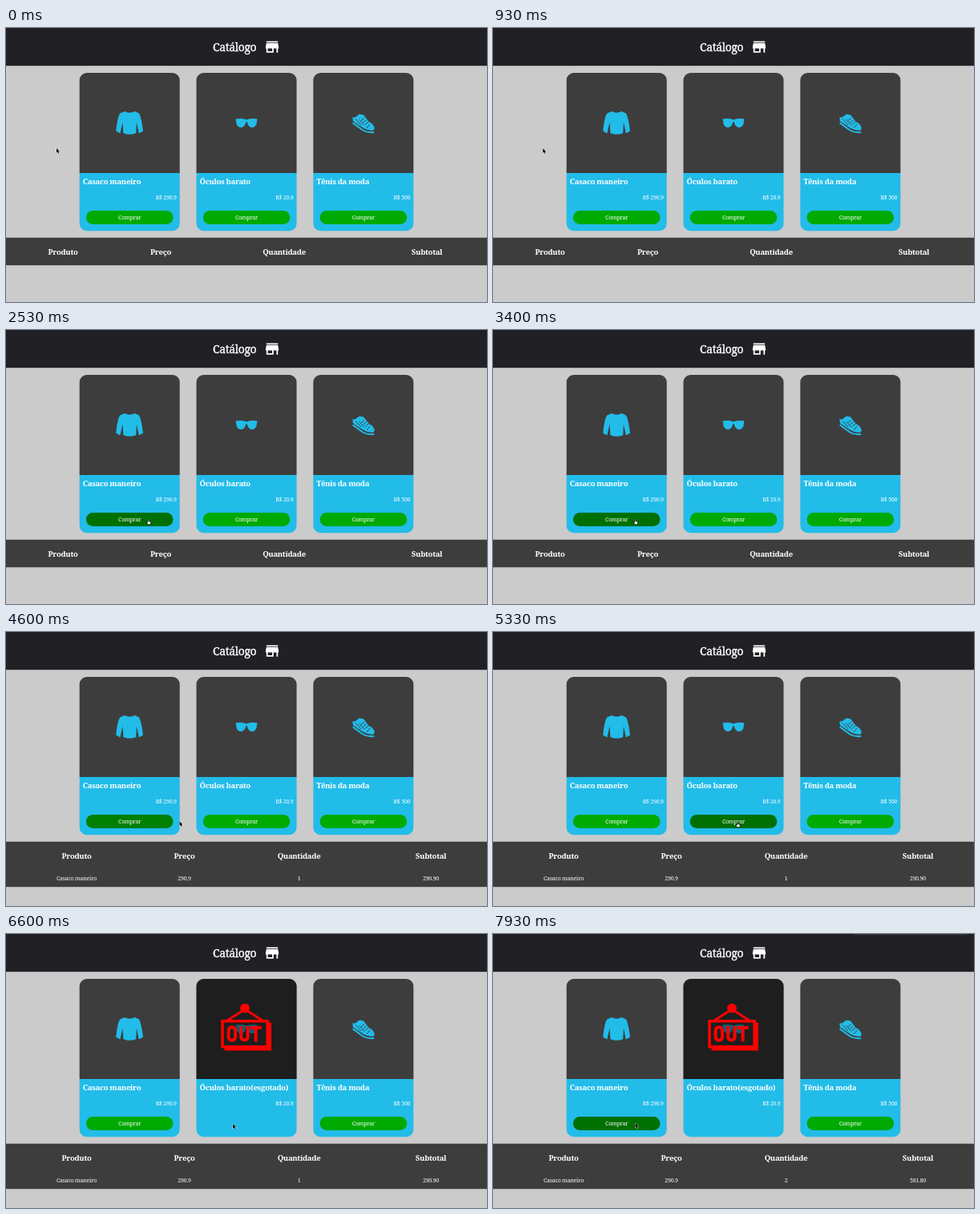
These frames come from a looping animation (600 px wide and 342 px high, 8 s). An HTML page:

```html
<!DOCTYPE html>
<html lang="pt-BR">
<head>
<meta charset="utf-8">
<title>Catálogo</title>
<style>
  html, body { margin: 0; width: 100%; height: 100%; overflow: hidden; background: #cbcbcb; }
  svg { display: block; width: 600px; height: 342px; }
  text { font: 7px "Noto Serif", serif; letter-spacing: -.03em; fill: #fff; }
  .heading { font-size: 13.8px; font-weight: 500; letter-spacing: -.02em; stroke: #fff; stroke-width: .35; }
  .title, .column { font-size: 9.5px; font-weight: 600; }
  .price { text-anchor: end; }
  .label, .column, .cell { text-anchor: middle; }
</style>
</head>
<body>
<svg viewBox="0 0 600 342">
  <rect width="600" height="342" fill="#cbcbcb"/>
  <rect width="600" height="47.2" fill="#212025"/>
  <text class="heading" x="258" y="29">Catálogo</text>
  <path transform="translate(321.2 12.8) scale(.9)" fill="#fff"
    d="M20 4H4v2h16V4zm1 10v-2l-1-5H4l-1 5v2h1v6h10v-6h4v6h2v-6h1zm-9 4H6v-4h6v4z"/>
  <rect id="popup" x="449" y="-13" width="143" height="12" rx="3" fill="#333337" stroke="#424246" stroke-width=".5"/>

  <g id="cards"></g>

  <g fill="#22bce9">
    <path d="M148 104Q154 107.6 160.5 104L166 106.6Q169 112 171 128.8L165.8 131.6 162.9 117.5 162.2 131.2Q154 134.4 146.4 131.2L145.5 117.5 142.4 131.6 137.2 128.8Q139 111 142.2 106.6Z"/>
    <path d="M286.5 113.6Q293 112 300 114.4 307 112 313.5 113.6L313 116.2Q312.5 124.2 306.5 124.2 302 124 300.8 117.6 300 116.6 299.2 117.6 298 124 293.5 124.2 287.5 124.2 287 116.2Z"/>
    <path d="M432.3 111.3Q435 112.4 438 109.4L441 107.6 446 108.6 452.8 117.2Q458.5 119.5 459.6 124.5 460 127 457 128 451 128 446 125L432.8 116.3Z"/>
    <path fill="none" stroke="#22bce9" stroke-width="2" d="M432.6 118.4L445 127.5Q451 131.2 459.2 129.9"/>
    <path fill="none" stroke="#3d3d3d" stroke-width=".9" d="M443 115.5l4-3.2M445.5 118l4-3.2M448 120.4l4-3.2M436 113.5l7 7.5M440.5 114l6.5 7.5M450 125l4-5"/>
  </g>

  <g id="soldOut">
    <path d="M237.5 181V65a9 9 0 0 1 9-9h107a9 9 0 0 1 9 9V181Z" fill="#000" opacity=".5"/>
    <circle cx="298" cy="92.6" r="5.9" fill="red"/>
    <path d="M272.5 145.6V142H327V110.5H331V145.6Z" fill="red"/>
    <g fill="none" stroke="red">
      <path stroke-width="3" d="M276 108L298 94 320 108"/>
      <path stroke-width="3.6" d="M270 108.8H326.2V140.8H270Z"/>
      <path stroke-width="4" d="M277.6 120.5a4.2 4.2 0 0 1 8.4 0v8a4.2 4.2 0 0 1-8.4 0ZM293.2 115V128.4a4.2 4.2 0 0 0 8.4 0V115M304.5 117H318.6M311.6 117V134.3"/>
    </g>
  </g>

  <rect id="tablePanel" y="261.7" width="600" height="34.5" fill="#3d3d3d"/>
  <g id="table"></g>

  <g id="cursor" stroke-linejoin="round">
    <path id="arrow" d="M0 0V5.7L1.3 4.5 2.3 6.7 3.3 6.3 2.3 4.2H4Z" stroke="#fff" stroke-width=".8" paint-order="stroke"/>
    <path id="hand" d="M-.6 .5Q0-.5.6.5V2.7L3.2 3.3V5L2.4 6.8H-.4L-2.3 4.1Q-1.7 3.2-.6 4.2Z" fill="#fff" stroke="#000" stroke-width=".7"/>
  </g>
</svg>
<script>
const DURATION = 8000;
const SOLD_OUT_AT = 5700;
const FIRST_SALE_AT = 3460;
const SECOND_SALE_AT = 7860;

const products = [
  { name: 'Casaco maneiro', price: '290.9', hovers: [[1990, 4550], [7270, 9000]] },
  { name: 'Óculos barato', price: '20.9', hovers: [[4690, 9000]] },
  { name: 'Tênis da moda', price: '500', hovers: [] },
];
const columns = ['Produto', 'Preço', 'Quantidade', 'Subtotal'];
const emptyColumnX = [71, 193, 347, 525];
const filledColumnX = [88, 222.5, 365.5, 530];

// Cursor stops: time, x, y
const cursorStops = [
  [0, 63, 150], [900, 62, 150], [1780, 141, 223], [1850, 141.5, 223.5],
  [2450, 177.5, 236], [4410, 177.5, 236], [4930, 305, 237],
  [5850, 305, 237], [6450, 283, 237], [6900, 283, 237],
  [7500, 177.5, 236], [DURATION, 177.5, 236],
];
const handTimes = [[1990, 4576], [4690, SOLD_OUT_AT], [7290, SECOND_SALE_AT]];

const byId = id => document.getElementById(id);
const clamp = v => Math.min(1, Math.max(0, v));
const mix = (a, b, u) => a + (b - a) * u;
const smooth = u => u * u * (3 - 2 * u);
const within = (t, [from, to]) => t >= from && t < to;
const show = (element, visible) => element.setAttribute('visibility', visible ? 'visible' : 'hidden');

byId('cards').innerHTML = products.map((p, i) => `
  <g transform="translate(${91.7 + 145.8 * i} 56)">
    <path d="M0 125V9a9 9 0 0 1 9-9H116a9 9 0 0 1 9 9V125Z" fill="#3d3d3d"/>
    <path d="M0 125H125V188.2a9 9 0 0 1-9 9H9a9 9 0 0 1-9-9Z" fill="#22bce9"/>
    <text class="title" x="4" y="139">${p.name}</text>
    <text class="price" x="121" y="158">R$ ${p.price}</text>
    <g class="buy">
      <rect x="8.2" y="172" width="108.6" height="17" rx="8.5"/>
      <text class="label" x="62.5" y="183.2">Comprar</text>
    </g>
  </g>`).join('');

byId('table').innerHTML =
  columns.map(c => `<text class="column" y="283">${c}</text>`).join('') +
  columns.map((c, i) => `<text class="cell" x="${filledColumnX[i]}" y="309.5"></text>`).join('');

const titles = document.querySelectorAll('.title');
const buttons = document.querySelectorAll('.buy');
const headers = document.querySelectorAll('.column');
const cells = document.querySelectorAll('.cell');

function drawCards(t) {
  const soldOut = t >= SOLD_OUT_AT;
  products.forEach((p, i) => {
    const level = p.hovers.reduce((sum, [enter, leave]) =>
      sum + clamp((t - enter) / 200) - clamp((t - leave) / 200), 0);
    buttons[i].firstElementChild.setAttribute('fill', `rgb(0,${Math.round(mix(170, 112, level))},0)`);
  });
  titles[1].textContent = products[1].name + (soldOut ? '(esgotado)' : '');
  show(buttons[1], !soldOut);
  show(byId('soldOut'), soldOut);
}

function drawTable(t) {
  const quantity = (t >= FIRST_SALE_AT) + (t >= SECOND_SALE_AT);
  const { name, price } = products[0];
  const row = quantity ? [name, price, quantity, (price * quantity).toFixed(2)] : ['', '', '', ''];
  const columnX = quantity ? filledColumnX : emptyColumnX;
  headers.forEach((header, i) => header.setAttribute('x', columnX[i]));
  cells.forEach((cell, i) => cell.textContent = row[i]);
  byId('tablePanel').setAttribute('height', quantity ? 56.5 : 34.5);
}

function drawCursor(t) {
  const next = cursorStops.findIndex(stop => stop[0] > t);
  const [t0, x0, y0] = cursorStops[next - 1];
  const [t1, x1, y1] = cursorStops[next];
  const u = smooth((t - t0) / (t1 - t0));
  const pointing = handTimes.some(range => within(t, range));
  byId('cursor').setAttribute('transform', `translate(${mix(x0, x1, u)} ${mix(y0, y1, u)})`);
  show(byId('hand'), pointing);
  show(byId('arrow'), !pointing);
}

function draw(now) {
  const t = now % DURATION;
  drawCards(t);
  drawTable(t);
  drawCursor(t);
  byId('popup').setAttribute('y', mix(-13, -11, clamp((t - 7700) / 200)));
  requestAnimationFrame(() => draw(performance.now() - start));
}

const start = performance.now();
draw(0);
</script>
</body>
</html>
```
